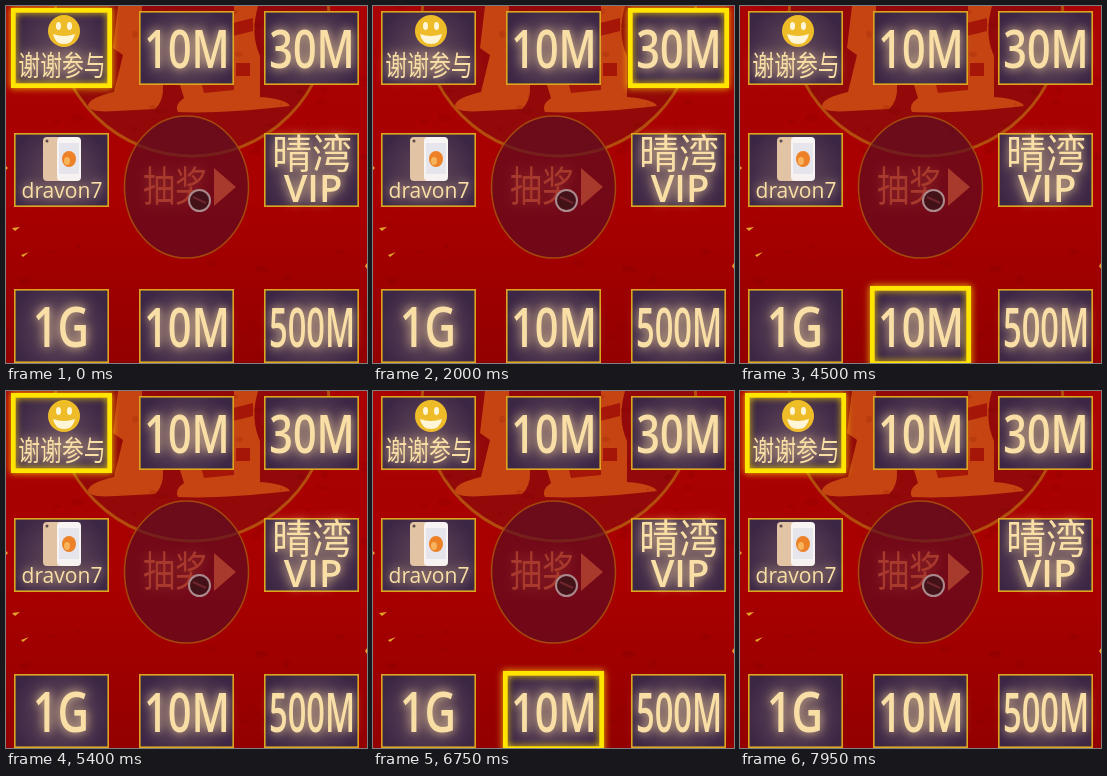
An HTML page with a canvas for the animation above (8000 ms loop, 361 by 357 pixels).

```html
<!DOCTYPE html>
<html lang="zh">
<head>
<meta charset="utf-8">
<style>
  html, body { margin: 0; width: 100%; height: 100%; overflow: hidden; background: #a00; }
  canvas { display: block; }
</style>
</head>
<body>
<canvas id="stage" width="361" height="357"></canvas>
<script>
const W = 361, H = 357, LOOP = 8000;
const CELL_W = 95, CELL_H = 74, SQUEEZE = 0.78;
const FONT = '"Open Sans", "Noto Sans CJK SC", "Noto Sans CJK", sans-serif';
const stage = document.getElementById('stage').getContext('2d');
const board = document.createElement('canvas');
board.width = W;
board.height = H;
const g = board.getContext('2d');

// Cells run clockwise from the top left
const cells = [[8, 5], [133, 5], [258, 5], [258, 127], [258, 283], [133, 283], [8, 283], [8, 127]];

let seed = 7;
const random = () => (seed = seed * 16807 % 2147483647) / 2147483647;

function ellipse(x, y, rx, ry, fill, stroke, width = 1) {
  g.beginPath();
  g.ellipse(x, y, rx, ry, 0, 0, 7);
  if (fill) { g.fillStyle = fill; g.fill(); }
  if (stroke) { g.strokeStyle = stroke; g.lineWidth = width; g.stroke(); }
}

function shape(path, fill) {
  g.fillStyle = fill;
  g.fill(new Path2D(path));
}

function label(text, x, y, size, { squeeze = 1, weight = 400, color = '#f9dfa6', glow = '#f3d49b', room = 86 } = {}) {
  g.save();
  g.translate(x, y);
  g.scale(squeeze, 1);
  g.font = `${weight} ${size}px ${FONT}`;
  g.textAlign = 'center';
  g.fillStyle = color;
  g.shadowColor = glow;
  g.shadowBlur = 11;
  g.fillText(text, 0, 0, room / squeeze);
  g.restore();
}

function drawBackground() {
  const red = g.createLinearGradient(0, 0, 0, H);
  red.addColorStop(0, '#a90303');
  red.addColorStop(0.55, '#a90000');
  red.addColorStop(1, '#930000');
  g.fillStyle = red;
  g.fillRect(0, 0, W, H);
  ellipse(186, 13, 137, 137, '#930909', '#b34c0c', 3);

  shape('M112 0H136V79H157Q158 95 149 103L110 105Q84 107 82 100Q82 92 108 86L117 49 107 42Z', '#c54411');
  shape('M228 0H252Q244 28 254 50V91Q280 93 284 100Q215 108 172 106Q168 99 178 92L174 79H228Z', '#c54411');
  shape('M227 17L247 12V25L227 30ZM230 57H244V70H230ZM196 79H228V84L198 87Z', '#a51608');

  for (let i = 0; i < 110; i++) {
    ellipse(random() * W, random() * H, 1 + random() * 6, 1 + random() * 3, 'rgba(105,0,0,.13)');
  }
  shape('M6 222L14 221 9 225ZM15 249L23 246 17 251ZM0 160L2 162 0 164ZM361 257L359 260 361 263Z', '#e3a32c');
}

function drawButton() {
  ellipse(180.5, 181, 62, 71, 'rgba(91,12,35,.68)', '#a4480d', 1.5);
  const color = '#a83a2d', glow = '#8c2a2a';
  label('抽奖', 169, 195, 41, { squeeze: SQUEEZE, color, glow });
  shape('M208 162L230 181 208 200Z', color);
  ellipse(193.5, 194.5, 10.5, 10.5, '#431219', '#aa8a8c', 2);
  g.strokeStyle = '#70252b';
  g.beginPath();
  g.moveTo(187, 191);
  g.lineTo(200, 197);
  g.stroke();
}

function drawCell([x, y]) {
  g.fillStyle = '#3c2645';
  g.fillRect(x, y, CELL_W, CELL_H);
  const shine = g.createRadialGradient(x + 47, y + 40, 5, x + 47, y + 40, 50);
  shine.addColorStop(0, 'rgba(150,120,115,.4)');
  shine.addColorStop(1, 'rgba(150,120,115,0)');
  g.fillStyle = shine;
  g.fillRect(x, y, CELL_W, CELL_H);
  g.strokeStyle = '#dca51f';
  g.lineWidth = 1.6;
  g.strokeRect(x + 0.8, y + 0.8, CELL_W - 1.6, CELL_H - 1.6);
}

function drawSmile() {
  ellipse(58, 25, 16, 16, '#eebc28');
  ellipse(52.5, 20, 2.5, 4, '#fff6d8');
  ellipse(63.5, 20, 2.5, 4, '#fff6d8');
  shape('M47 28Q58 32 69 28Q67 38 58 38Q49 38 47 28Z', '#fff6d8');
}

function drawPhone() {
  g.fillStyle = '#e2c3a4';
  g.beginPath();
  g.roundRect(37, 131, 22, 44, 4);
  g.fill();
  ellipse(41, 135, 1.5, 1.5, '#5b4a45');
  g.fillStyle = '#f7f4f3';
  g.beginPath();
  g.roundRect(51, 131, 24, 44, 4);
  g.fill();
  g.fillStyle = '#e5e5eb';
  g.fillRect(53, 137, 20, 31);
  ellipse(63, 153, 7, 8, '#ed8127');
  ellipse(61, 155, 3, 4, '#f7b45c');
}

function drawPrizes() {
  cells.forEach(drawCell);
  drawSmile();
  drawPhone();
  const big = { squeeze: SQUEEZE, weight: 600 };
  label('谢谢参与', 56, 70, 28, { squeeze: SQUEEZE, room: 90 });
  label('10M', 181, 62, 53, big);
  label('30M', 306, 62, 53, big);
  label('晴湾', 306, 162, 40);
  label('VIP', 307, 196, 38, { weight: 600 });
  label('500M', 306, 341, 55, big);
  label('10M', 181, 341, 55, big);
  label('1G', 55, 341, 56, big);
  label('dravon7', 56, 192, 21);
}

// Slow steps first, then a fast spin sampled every 150 ms
const slowSteps = [0, 1000, 2000, 3000, 3900, 4500, 5100];
const SPIN_START = 5400;
const spin = [[0], [1], [3], [4], [6], [7], [1], [2], [4], [5], [7], [0], [1, 2], [3], [4], [6], [7], [0]];

function activeCells(t) {
  return t < SPIN_START
    ? [slowSteps.filter(start => start <= t).length - 1]
    : spin[Math.floor((t - SPIN_START) / 150)];
}

function highlight([x, y]) {
  stage.save();
  stage.strokeStyle = '#ffe500';
  stage.shadowColor = '#ffd800';
  stage.shadowBlur = 7;
  stage.lineWidth = 4.5;
  stage.strokeRect(x - 0.8, y - 0.8, CELL_W + 1.6, CELL_H + 1.6);
  stage.restore();
}

function render(now) {
  stage.drawImage(board, 0, 0);
  activeCells(now % LOOP).forEach(i => highlight(cells[i]));
  requestAnimationFrame(render);
}

drawBackground();
drawButton();
drawPrizes();
requestAnimationFrame(render);
</script>
</body>
</html>
```
